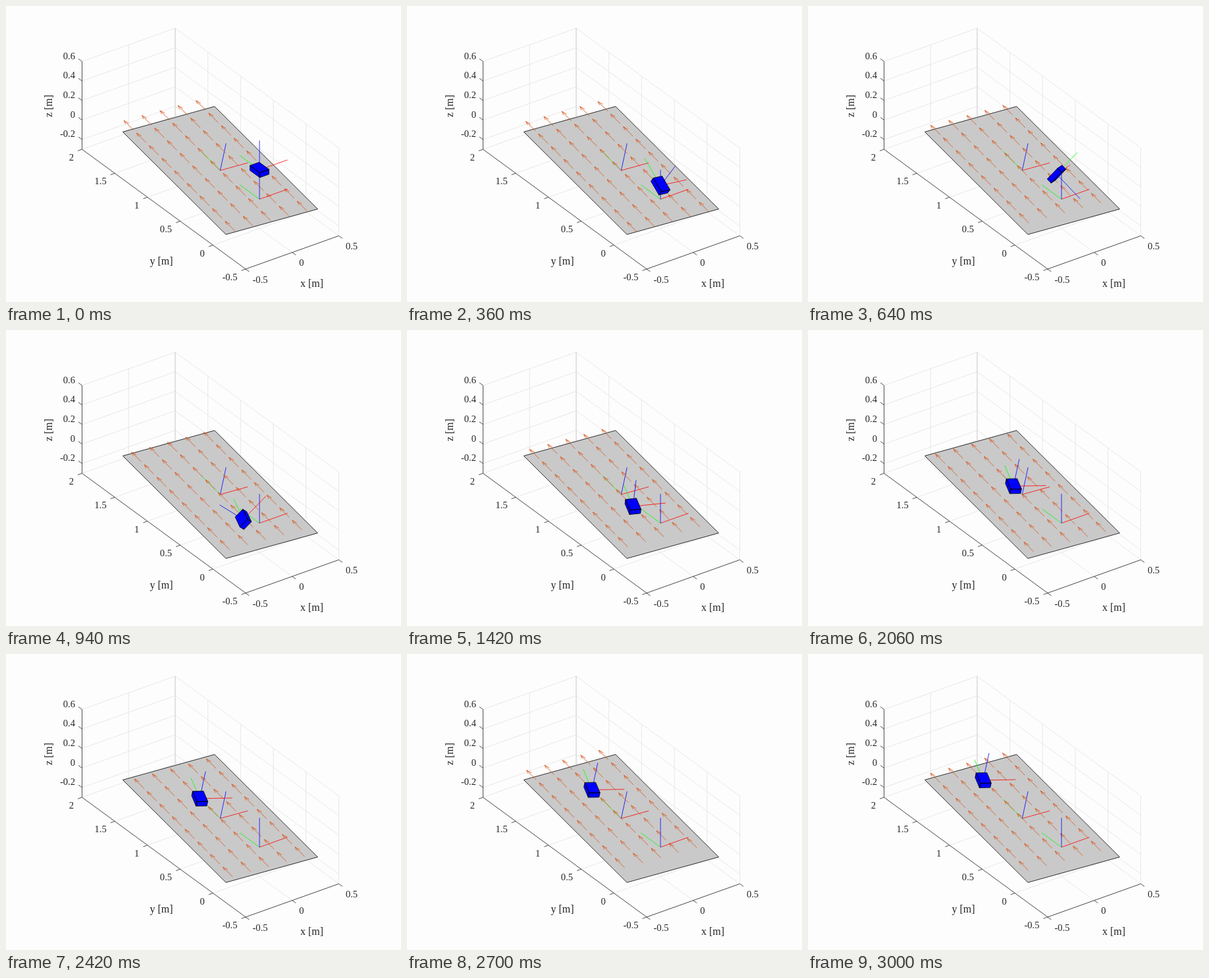
Animation, 600 px wide and 450 px high, one loop 3030 ms. Source, as an HTML page:

```html
<!DOCTYPE html>
<html lang="en">
<head>
<meta charset="utf-8">
<title>Box on a conveyor</title>
<style>
  html, body { margin: 0; width: 100%; height: 100%; overflow: hidden; background: #fdfdfd; }
  svg { display: block; width: 600px; height: 450px; }
  path { fill: none; stroke-width: .8; stroke-linejoin: round; }
  text { font: 14.6px "Liberation Serif", "Noto Serif", serif; fill: #262626; }
  .title { font-size: 16px; text-anchor: middle; }
</style>
</head>
<body>
<svg id="stage" viewBox="0 0 600 450"></svg>
<script>
const stage = document.getElementById('stage');
const LOOP = 3030, FPS = 33, SPEED = 0.5, GAP = 0.1963, ARROW = 0.15;

function add(tag, attrs, text) {
  const el = document.createElementNS('http://www.w3.org/2000/svg', tag);
  for (const k in attrs) el.setAttribute(k, attrs[k]);
  if (text) el.textContent = text;
  return stage.appendChild(el);
}
const stroke = (color, d = '', fill = 'none') => add('path', { d, style: `stroke:${color};fill:${fill}` });

// orthographic view of world metres
const project = ([x, y, z]) => [385.05 + 141.5 * x - 99.4 * y, 293.7 - 50.5 * x - 72.8 * y - 148.5 * z];
const pathOf = pts => 'M' + pts.map(p => p.map(n => n.toFixed(2)).join(' ')).join('L');
const line = (...pts) => pathOf(pts.map(project));
const plus = (a, b) => a.map((n, i) => n + b[i]);
const mix = (a, b, u) => a.map((n, i) => n + (b[i] - n) * u);

// quaternions [w, x, y, z]
function quat(v) {
  const a = Math.hypot(...v);
  const s = a ? Math.sin(a / 2) / a : 0;
  return [Math.cos(a / 2), ...v.map(n => n * s)];
}
function mul([a, b, c, d], [e, f, g, h]) {
  return [a * e - b * f - c * g - d * h, a * f + b * e + c * h - d * g,
          a * g - b * h + c * e + d * f, a * h + b * g - c * f + d * e];
}
const rotate = (q, v) => mul(mul(q, [0, ...v]), [q[0], -q[1], -q[2], -q[3]]).slice(1);
function slerp(p, q, u) {
  let dot = p.reduce((s, n, i) => s + n * q[i], 0);
  if (dot < 0) { q = q.map(n => -n); dot = -dot; }
  if (dot > 0.99999) return p;
  const a = Math.acos(dot);
  return p.map((n, i) => (n * Math.sin((1 - u) * a) + q[i] * Math.sin(u * a)) / Math.sin(a));
}

const deg = Math.PI / 180;
const tilt = mul(quat([10 * deg, 0, 0]), quat([0, 5 * deg, 0]));
const rest = mul(tilt, quat([0, 0, -20 * deg]));
const rocked = mul(quat([0, -0.1, 0]), rest);
const centre = [0, 0.6, 0];
const onBelt = (a, b) => plus(centre, rotate(tilt, [a, b, 0]));

// time, position; a true flag means free flight until the next key
const moves = [
  [0, [0, 0, 0.3], true],
  [0.272, [0, 0, -0.063], true],
  [0.3636, [0, 0, 0.14], true],
  [0.79, [-0.04, 0.06, -0.015], true],
  [0.9394, [-0.0675, 0.151, -0.012], true],
  [1.1, [-0.0273, 0.222, -0.0336], false],
  [3, [-0.0267, 1.1588, 0.1263], false]
];
const turns = [
  [0, quat([0, 0, 0])],
  [0.272, quat([0, 0, 0])],
  [0.3636, quat([0.53, 0.18, 0.016])],
  [0.79, quat([2.93, 0.995, 0.09])],
  [0.9394, quat([-0.024, -0.852, -0.359])],
  [1.2, rocked],
  [1.4242, rocked],
  [1.58, rest],
  [3, rest]
];
function segment(keys, t) {
  let i = 0;
  while (i < keys.length - 2 && t >= keys[i + 1][0]) i++;
  const [a, b] = [keys[i], keys[i + 1]];
  return [a, b, (t - a[0]) / (b[0] - a[0])];
}
function place(t) {
  const [a, b, u] = segment(moves, t);
  const p = mix(a[1], b[1], u);
  if (a[2]) p[2] += 4.905 * (t - a[0]) * (b[0] - t);
  return p;
}
function pose(t) {
  const [a, b, u] = segment(turns, t);
  return slerp(a[1], b[1], u);
}

// axes box
const X0 = -0.5, X1 = 0.5, Y0 = -0.5, Y1 = 2, Z0 = -0.3, Z1 = 0.6;
const xs = [-0.5, 0, 0.5], ys = [2, 1.5, 1, 0.5, 0, -0.5], zs = [0.6, 0.4, 0.2, 0, -0.2];
let grid = '';
for (const x of xs) grid += line([x, Y0, Z0], [x, Y1, Z0], [x, Y1, Z1]);
for (const y of ys) grid += line([X0, y, Z0], [X1, y, Z0], [X1, y, Z1]);
for (const z of zs) grid += line([X0, Y1, z], [X1, Y1, z], [X1, Y0, z]);
stroke('#e2e2e2', grid);
stroke('#d2d2d2', line([X1, Y1, Z0], [X1, Y1, Z1]));

let rules = line([X0, Y1, Z1], [X0, Y1, Z0], [X0, Y0, Z0], [X1, Y0, Z0]);
const tick = (p, dx, dy) => {
  const [x, y] = project(p);
  rules += pathOf([[x, y], [x + dx, y + dy]]);
};
const label = (n, x, y, anchor) => add('text', { x, y, 'text-anchor': anchor }, String(n));
xs.forEach((x, i) => {
  tick([x, Y0, Z0], 5.5, 4);
  label(x, 374.5 + 70.7 * i, 420.5 - 25.2 * i, 'start');
});
ys.forEach((y, i) => {
  tick([X0, y, Z0], -6.5, 2.3);
  label(y, 103 + 49.7 * i, 235 + 36.4 * i, 'end');
});
zs.forEach((z, i) => {
  tick([X0, Y1, z], -5.5, -4);
  label(z, 105, 80.6 + 29.7 * i, 'end');
});
stroke('#262626', rules);
add('text', { class: 'title', x: 464.5, y: 426.5 }, 'x [m]');
add('text', { class: 'title', x: 236, y: 393 }, 'y [m]');
add('text', { class: 'title', transform: 'translate(70 152) rotate(-90)' }, 'z [m]');

stroke('#000', line(onBelt(-0.5, -0.8), onBelt(0.5, -0.8), onBelt(0.5, 0.8), onBelt(-0.5, 0.8)) + 'Z', '#c9c9c9');

const units = [[0.3, 0, 0], [0, 0.3, 0], [0, 0, 0.3]];
const triad = () => ['#f00', '#0f0', '#00f'].map(c => stroke(c));
function setTriad(paths, at, q) {
  paths.forEach((el, i) => el.setAttribute('d', line(at, plus(at, rotate(q, units[i])))));
}
setTriad(triad(), centre, tilt);
const arrows = stroke('#d95319');
setTriad(triad(), [0, 0, 0], quat([0, 0, 0]));
const boxAxes = triad();
const box = stroke('#000', '', '#00f');

function arrowPath(t) {
  const shift = SPEED * t % GAP;
  let d = '';
  for (let k = -5; k <= 4; k++) {
    const tail = k * GAP + shift;
    if (Math.abs(tail) > 0.8) continue;
    const tip = tail + ARROW, back = tip - 0.05;
    for (let c = -2; c <= 2; c++) {
      const a = c * GAP;
      d += line(onBelt(a, tail), onBelt(a, tip));
      d += line(onBelt(a - 0.017, back), onBelt(a, tip), onBelt(a + 0.017, back));
    }
  }
  return d;
}

const half = [0.05, 0.075, 0.025];
function boxPath(at, q) {
  let d = '';
  for (let axis = 0; axis < 3; axis++) {
    for (const side of [-1, 1]) {
      const pts = [[-1, -1], [1, -1], [1, 1], [-1, 1]].map(([m, n]) => {
        const v = [0, 0, 0], j = (axis + 1) % 3, k = (axis + 2) % 3;
        v[axis] = side * half[axis];
        v[j] = m * half[j] * side;
        v[k] = n * half[k];
        return project(plus(at, rotate(q, v)));
      });
      const [a, b, c] = pts;
      const facing = (b[0] - a[0]) * (c[1] - a[1]) - (b[1] - a[1]) * (c[0] - a[0]) < 0;
      if (facing) d += pathOf(pts) + 'Z';
    }
  }
  return d;
}

function draw(ms) {
  const step = Math.ceil((Math.floor(ms / 10) + 0.5) * FPS / 100) - 1;
  const t = step / FPS;
  const at = place(t), q = pose(t);
  arrows.setAttribute('d', arrowPath(t));
  setTriad(boxAxes, at, q);
  box.setAttribute('d', boxPath(at, q));
}

const start = performance.now();
function tickFrame() {
  draw((performance.now() - start) % LOOP);
  requestAnimationFrame(tickFrame);
}
tickFrame();
</script>
</body>
</html>
```
